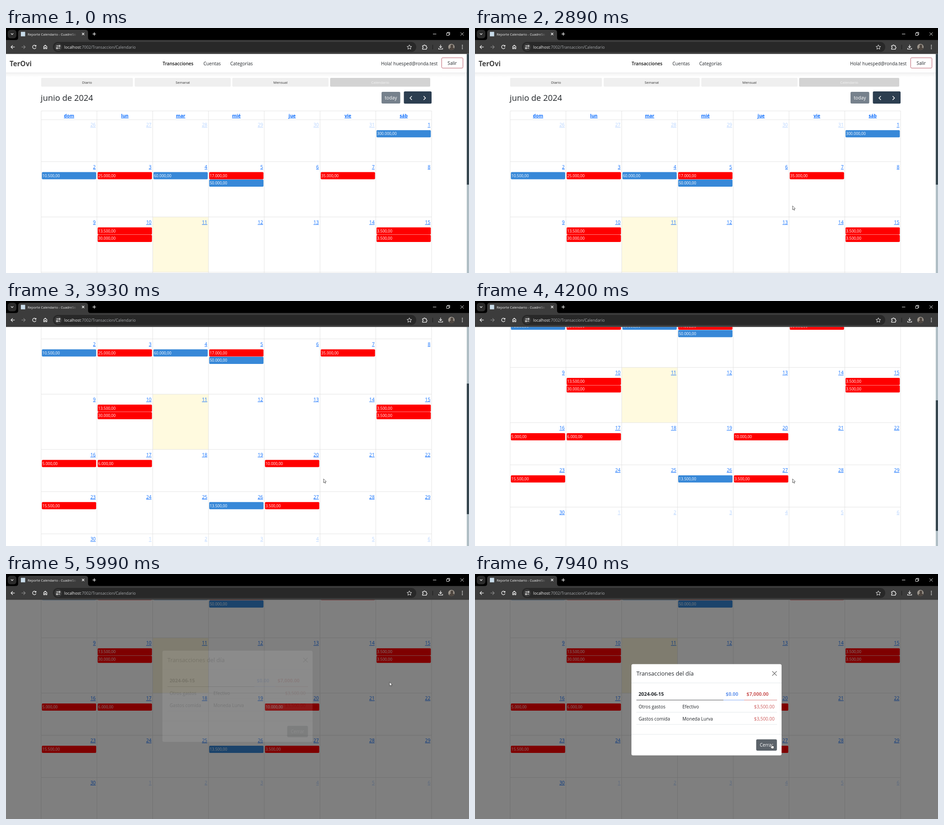
An HTML page for the animation above (8000 ms loop, 1027 px wide and 545 px high).

```html
<!DOCTYPE html>
<html lang="es">
<head>
<meta charset="utf-8">
<title>Reporte Calendario</title>
<style>
  html, body { margin: 0; width: 100%; height: 100%; overflow: hidden; background: #fff; }
  svg { display: block; width: 100%; height: 100%; }
  text { font-family: "Open Sans", "Noto Sans", sans-serif; white-space: pre; }
  .link { fill: #0d6efd; text-decoration: underline; }
  .icon { fill: none; stroke: #f1f1f1; stroke-width: 1.3; }
</style>
</head>
<body>
<svg id="stage" viewBox="0 0 1027 545" preserveAspectRatio="none"></svg>
<script>
const LOOP = 8000;
const MAX_SCROLL = 278.3;
const BODY = 10.1;
const INK = '#212529', BLUE = '#3788d8', RED = '#ff0000', RULE = '#dddddd';
const INCOME = '#6495ed', EXPENSE = '#cd5c5c';

const rect = (x, y, w, h, fill, more = '') =>
  `<rect x="${x}" y="${y}" width="${w}" height="${h}" fill="${fill}" ${more}/>`;
const text = (x, y, str, size = BODY, fill = INK, more = '') =>
  `<text x="${x}" y="${y}" font-size="${size}" fill="${fill}" ${more}>${str}</text>`;
const line = (x1, y1, x2, y2, color = RULE, w = 0.8) =>
  `<path d="M${x1} ${y1}L${x2} ${y2}" stroke="${color}" stroke-width="${w}"/>`;
const icon = (d, more = '') => `<path class="icon" d="${d}" ${more}/>`;
const MID = 'text-anchor="middle"', END = 'text-anchor="end"';
const BOLD = 'font-weight="700"', SEMI = 'font-weight="600"';

// Calendar
const LEFT = 78, COL = 866 / 7;
const ROWS = [204, 297.3, 420.3, 543.2, 637.1, 731, 825];
const DAYS = ['dom', 'lun', 'mar', 'mié', 'jue', 'vie', 'sáb'];
const EVENTS = {
  1: '+300.000', 2: '+10.500', 3: '-25.000', 4: '+60.000', 5: '-17.000 +50.000',
  7: '-35.000', 10: '-13.500 -30.000', 15: '-3.500 -3.500', 16: '-5.000',
  17: '-6.000', 20: '-10.000', 23: '-15.500', 26: '+13.500', 27: '-3.500'
};
const colX = c => LEFT + c * COL;

function eventBar(x, y, entry) {
  return rect(x + 1.6, y, COL - 3.3, 16, entry[0] === '+' ? BLUE : RED, 'rx="2"') +
    text(x + 2.8, y + 11.2, entry.slice(1) + ',00', 8.55, '#fff');
}

function dayCell(i) {
  const x = colX(i % 7), row = Math.floor(i / 7), y = ROWS[row];
  const day = i - 5, inMonth = day >= 1 && day <= 30;
  const label = day < 1 ? day + 31 : day > 30 ? day - 30 : day;
  let out = day === 11 ? rect(x, y, COL, ROWS[row + 1] - y, 'rgba(255,220,40,.15)') : '';
  out += text(x + COL - 2.7, y + 15.4, label, 10.3, '', `class="link" ${END} opacity="${inMonth ? 1 : 0.3}"`);
  if (inMonth && EVENTS[day]) {
    EVENTS[day].split(' ').forEach((e, k) => out += eventBar(x, y + 23.2 + k * 16.5, e));
  }
  return out;
}

function calendar() {
  let out = '';
  for (let i = 0; i < 42; i++) out += dayCell(i);
  DAYS.forEach((d, c) =>
    out += text(colX(c) + COL / 2, 198.8, d, 10.2, '', `class="link" ${MID} ${BOLD}`));
  for (let c = 0; c <= 7; c++) out += line(colX(c), 184.5, colX(c), 825);
  [184.5, ...ROWS].forEach(y => out += line(LEFT, y, 944, y));
  return out;
}

function navbar() {
  return rect(0, 100, 1022, 9, 'url(#shade)') + rect(0, 57, 1022, 42.5, '#fff') +
    line(0, 99.6, 1022, 99.6, '#e3e5e8') +
    text(8, 85, 'TerOvi', 15.2, '#444', BOLD) +
    text(347.5, 83.3, 'Transacciones', 10.05, '#111', SEMI) +
    text(438, 83.3, 'Cuentas') + text(497.5, 83.3, 'Categorías') +
    text(832, 83.3, 'Hola! huesped@ronda.test') +
    rect(966.4, 66.2, 47.2, 23, '#fff', 'rx="2.5" stroke="#b95a69"') +
    text(989.8, 81.6, 'Salir', BODY, INK, MID);
}

function toolbarRow() {
  const tabs = [['Diario', 78, 203.5], ['Semanal', 285.5, 213], ['Mensual', 502, 213.5], ['Calendario', 719, 222]];
  return tabs.map(([name, x, w], i) =>
      rect(x, 111, w, 19.5, i === 3 ? '#d3d3d3' : '#efefef', 'rx="2"') +
      text(x + w / 2, 123.8, name, 7.9, i === 3 ? '#f4f4f4' : '#333', MID)).join('') +
    text(77, 162.2, 'junio de 2024', 18.4) +
    rect(833, 142, 41.5, 26, '#76818c', 'rx="2.5"') +
    text(853.7, 159, 'today', 10.3, '#fff', MID) +
    rect(882.5, 141, 61.5, 27.3, '#2c3e50', 'rx="2.5"') +
    icon('M900.3 151.5l-4.2 4.2 4.2 4.2M926.3 151.5l4.2 4.2-4.2 4.2', 'style="stroke:#fff;stroke-width:1.5"');
}

function modal() {
  const row = (y, what, account) =>
    text(363, y, what) + text(460, y, account) +
    text(664.5, y, '$3,500.00', BODY, EXPENSE, END) + line(358, y + 9, 670, y + 9, '#dee2e6');
  return rect(347, 200.5, 333, 203, '#fff', 'rx="3.5"') +
    text(358, 226.3, 'Transacciones del día', 12.8) +
    icon('M659.3 216.3l10 10M669.3 216.3l-10 10', 'style="stroke:#777"') +
    line(347, 242.3, 680, 242.3, '#dee2e6') + line(347, 356.7, 680, 356.7, '#dee2e6') +
    text(362.7, 271.2, '2024-06-15', 10.8, INK, BOLD) +
    text(556.3, 271.2, '$0.00', 10.7, INCOME, BOLD) +
    text(602.3, 271.2, '$7,000.00', 10.7, EXPENSE, BOLD) +
    line(358, 280.4, 551, 280.4, INK) + line(551, 280.4, 597, 280.4, INCOME) +
    line(597, 280.4, 670, 280.4, EXPENSE) +
    row(298.5, 'Otros gastos', 'Efectivo') + row(325.7, 'Gastos comida', 'Moneda Lurva') +
    rect(623.7, 367.7, 46, 25.3, '#6c757d', 'rx="3" id="closeButton"') +
    text(646.6, 384, 'Cerrar', BODY, '#fff', MID);
}

function browser() {
  return rect(0, 0, 1027, 27, '#000') + rect(0, 26.7, 1027, 31, '#3c3c3c') +
    rect(4, 4, 19, 19, '#2b2b2b', 'rx="6"') + icon('M11 12l2.6 2.6 2.6-2.6') +
    '<path d="M21 27q6 0 6-6V10q0-6 6-6H176q6 0 6 6v11q0 6 6 6z" fill="#3c3c3c"/>' +
    rect(33, 8.5, 9.5, 10, '#c9dcea') +
    text(48, 16.5, 'Reporte Calendario - CuadreSo', 7.45, '#f1f1f1') +
    rect(140, 6, 23, 16, 'url(#tabFade)') +
    icon('M168.6 10.8l5 5M173.6 10.8l-5 5') +
    `<g id="windowKeys">${icon('M192 13.3h7.4M195.7 9.6v7.4') +
      icon('M947 13.4h7.4M977.4 11.2h5.3v5.3h-5.3zM979 11v-1.4h5.3v5.3h-1.4M1008.2 9.8l7 7M1015.2 9.8l-7 7', 'stroke-width="1" style="stroke-width:1"')}</g>` +
    icon('M19.3 42.3h-8M15 38.4l-3.9 3.9 3.9 3.9') +
    icon('M34.5 42.3h8M38.8 38.4l3.9 3.9-3.9 3.9', 'style="stroke:#858585"') +
    icon('M66 39.8a3.9 3.9 0 1 0 .6 3.6M66.6 37.9v2.7h-2.8') +
    icon('M83.6 46.2v-5l3.5-3 3.5 3v5h-2.3v-3h-2.4v3z') +
    rect(104, 31, 806, 22.5, '#282828', 'rx="11.2"') +
    '<circle cx="115.8" cy="42.3" r="8.3" fill="#3c3c3c"/>' +
    icon('M111.8 40h4.2M115.8 44.7h4.2') +
    '<g class="icon"><circle cx="118.6" cy="40" r="1.4"/><circle cx="113.2" cy="44.7" r="1.4"/></g>' +
    text(129, 45.6, 'localhost<tspan fill="#a5a8ab">:7002/Transaccion/Calendario</tspan>', 8.8, '#f1f1f1') +
    icon('M894.7 37.5l1.5 3.3 3.6.4-2.7 2.4.8 3.6-3.2-1.9-3.2 1.9.8-3.6-2.7-2.4 3.6-.4z', 'style="stroke-width:1"') +
    icon('M924 39.3h2.7a1.6 1.6 0 0 1 3.2 0h2.5v2.8a1.6 1.6 0 0 1 0 3.2v2H924v-2.6a1.5 1.5 0 0 0 0-3z') +
    line(946.5, 37.5, 946.5, 47.5, '#1f1f1f', 1.2) +
    icon('M964 37.3v6.4M961.2 41l2.8 2.8 2.8-2.8M959.6 44.4v2.5h8.9v-2.5') +
    '<g clip-path="url(#round)"><path d="M981 35h14v15h-14z" fill="#9b948b"/>' +
    '<path d="M983 50q0-6 4-7a3 3.4 0 1 1 4 0q4 1 4 7z" fill="#4d453f"/></g>' +
    [38.6, 42.3, 46].map(y => `<circle cx="1012.3" cy="${y}" r="1.1" fill="#f1f1f1"/>`).join('');
}

const defs = `<defs>
  <linearGradient id="shade" x2="0" y2="1"><stop stop-opacity=".05"/><stop offset="1" stop-opacity="0"/></linearGradient>
  <linearGradient id="tabFade"><stop stop-color="#3c3c3c" stop-opacity="0"/><stop offset=".85" stop-color="#3c3c3c"/></linearGradient>
  <clipPath id="round"><circle cx="988" cy="42.3" r="7"/></clipPath>
  <clipPath id="view"><rect y="57.5" width="1027" height="488"/></clipPath></defs>`;

document.getElementById('stage').innerHTML = defs + rect(0, 0, 1027, 545, '#fff') +
  `<g clip-path="url(#view)">
    <g id="page">${navbar() + toolbarRow() + calendar()}</g>
    <g id="scrollbar">${rect(1022, 57, 5, 488, '#b0bec5') + rect(1022, 58, 5, 290.5, '#37474f', 'id="thumb"')}</g>
    ${rect(0, 57, 1027, 488, '#000', 'id="backdrop"')}
    <g id="modal">${modal()}</g>
  </g>${browser()}
  <path id="arrow" d="M.4.4V9l2-1.8 1.3 3 1.4-.6-1.3-2.9 2.7-.2z" fill="#fff" stroke="#222" stroke-width=".7"/>
  <path id="hand" d="M2.6 6.2V1.4q0-1 .8-1t.8 1v3l2.9.6q1.3.3 1.2 1.6l-.5 2.6-.7 1.6H3.4L.7 7.2q-.6-1 .2-1.2t1.7 1z" fill="#fff" stroke="#222" stroke-width=".6"/>`;

// Held positions: [time, x, y]
const POINTER = [
  [530, 613, 424], [600, 616, 441], [680, 620, 464], [750, 623, 486], [830, 625, 503],
  [990, 625.6, 507], [1640, 631, 520], [1800, 645, 494], [1880, 668, 455], [1970, 692, 417],
  [2050, 704.5, 395], [2890, 704, 395.3], [4450, 745, 352], [4540, 800, 292], [4640, 848.5, 248],
  [4820, 850, 241], [4960, 850.4, 240], [6870, 835, 263], [6960, 800, 292], [7060, 769, 313],
  [7210, 755, 321], [7290, 731, 336], [7360, 706, 351], [7440, 680, 366], [7520, 661, 375],
  [7700, 657, 377.5], [7940, 654.8, 377.8]
];
// [time, page offset, offset shown by the scrollbar]
const SCROLL = [
  [0, 0, 0], [3380, 12, 5], [3440, 58, 43], [3500, 118, 102], [3560, 168, 156],
  [3620, 200, 194], [3680, 208.7, 208.7], [3930, 213, 211], [4010, 231, 228],
  [4110, 256, 254], [4200, 272.5, 273.5], [4230, MAX_SCROLL, MAX_SCROLL]
];
const FADE_STEPS = [[0], [5810], [5910], [5990], [6080], [6140], [6200]];

const held = (keys, t) => keys.filter(k => k[0] <= t).pop();
const clamp = v => Math.max(0, Math.min(1, v));
const el = id => document.getElementById(id);
const set = (id, name, value) => el(id).setAttribute(name, value);
const show = (id, on) => set(id, 'visibility', on ? 'visible' : 'hidden');

function draw(t) {
  const [, offset, barOffset] = held(SCROLL, t);
  set('page', 'transform', `translate(0 ${-offset})`);
  set('thumb', 'y', 58 + barOffset * 0.5955);
  show('scrollbar', t < 5810);

  const [fade] = held(FADE_STEPS, t);
  set('backdrop', 'opacity', 0.5 * clamp((fade - 5792) / 150));
  set('modal', 'opacity', clamp((fade - 5976) / 150));
  const drop = 33.4 * Math.pow(1 - clamp((fade - 5976) / 224), 1.72);
  set('modal', 'transform', `translate(0 ${-drop})`);

  const hover = t >= 7700;
  set('closeButton', 'fill', hover ? '#5c636a' : '#6c757d');
  set('windowKeys', 'opacity', t >= 1560 && t < 1640 ? 0.4 : 1);

  const pointer = held(POINTER, t);
  show('arrow', pointer && !hover);
  show('hand', hover);
  if (pointer) set(hover ? 'hand' : 'arrow', 'transform', `translate(${pointer[1]} ${pointer[2]})`);
}

const start = performance.now();
function tick() {
  draw((performance.now() - start) % LOOP);
  requestAnimationFrame(tick);
}
tick();
</script>
</body>
</html>
```
